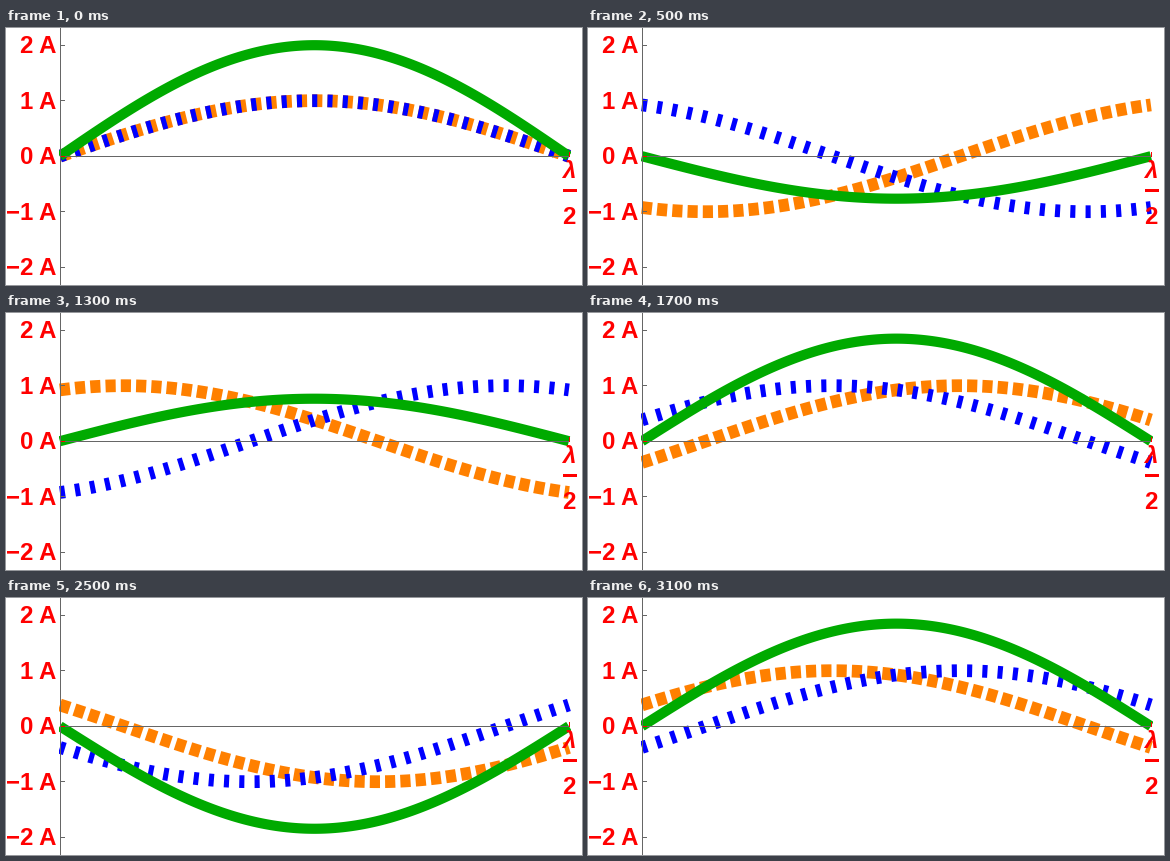
Write a matplotlib script that moves like this. It is 576 by 257 pixels and loops after 3200 ms.

```python
import matplotlib.pyplot as plt
import numpy as np
from matplotlib.animation import FuncAnimation
from matplotlib.patches import Rectangle

W, H, DPI = 576, 257, 64
PT = 72 / DPI                     # points per pixel
FRAMES, STEP_MS, PERIOD = 32, 100, 16

X0, SPAN = 53.9, 509              # start and width of the half wavelength
Y0, UNIT = 128.2, 55.5            # zero level and pixels per amplitude
AXIS_X, END_X = 54.5, 563.5
RED, GRAY = "#ff0000", "#666666"
ORANGE, BLUE, GREEN = "#ff8000", "#0000ff", "#00aa00"

plt.rcParams["path.simplify"] = False
plt.rcParams["font.family"] = "Liberation Sans"

fig = plt.figure(figsize=(W / DPI, H / DPI), dpi=DPI, facecolor="white")
ax = fig.add_axes([0, 0, 1, 1])
ax.set_xlim(0, W)
ax.set_ylim(H, 0)
ax.axis("off")

phase = np.linspace(0, np.pi, 400)
xs = X0 + SPAN * phase / np.pi
window = Rectangle((53, 0), 512, H, transform=ax.transData)


def wave(color, width, z, dash=None):
    """Empty curve; width and dash are fractions of the span."""
    line, = ax.plot([], [], color=color, lw=width * SPAN * PT, zorder=z,
                    snap=False, solid_capstyle="butt", dash_capstyle="butt")
    if dash:
        line.set_dashes([d / width for d in dash])
    line.set_clip_path(window)
    return line


def rule(x, y, color=GRAY, width=1, z=5):
    ax.plot(x, y, color=color, lw=width * PT, zorder=z, snap=False,
            solid_capstyle="butt")


def label(x, y, text, align="right", style="normal"):
    ax.text(x, y, text, color=RED, size=24 * PT, weight="bold", style=style,
            ha=align, va="baseline", zorder=8)


right = wave(ORANGE, 0.025, 1, (0.02, 0.01))
left = wave(BLUE, 0.025, 2, (0.01, 0.02))
total = wave(GREEN, 0.02, 3)

# axes and ticks
rule([AXIS_X, AXIS_X], [0, H])
rule([54, 564], [128.5, 128.5])
for n in range(-2, 3):
    y = Y0 - n * UNIT
    row = np.floor(y) + 0.5
    rule([55, 59], [row, row], GRAY if n else RED, z=6)
    label(50.5, y + 8.2, f"{n} A".replace("-", "\u2212"))
rule([END_X, END_X], [124, 129], RED, z=6)

# fraction at the right end
label(563, 150, "\u03bb", "center", "italic")
rule([557, 571], [162.5, 162.5], RED, 3, 8)
label(563, 196, "2", "center")


def draw(i):
    turn = 2 * np.pi * i / PERIOD
    a, b = np.sin(phase - turn), np.sin(phase + turn)
    for line, v in ((right, a), (left, b), (total, a + b)):
        line.set_data(xs, Y0 - UNIT * v)
    return right, left, total


anim = FuncAnimation(fig, draw, frames=FRAMES, interval=STEP_MS,
                     repeat=True, repeat_delay=0, blit=False)
plt.show()
```
